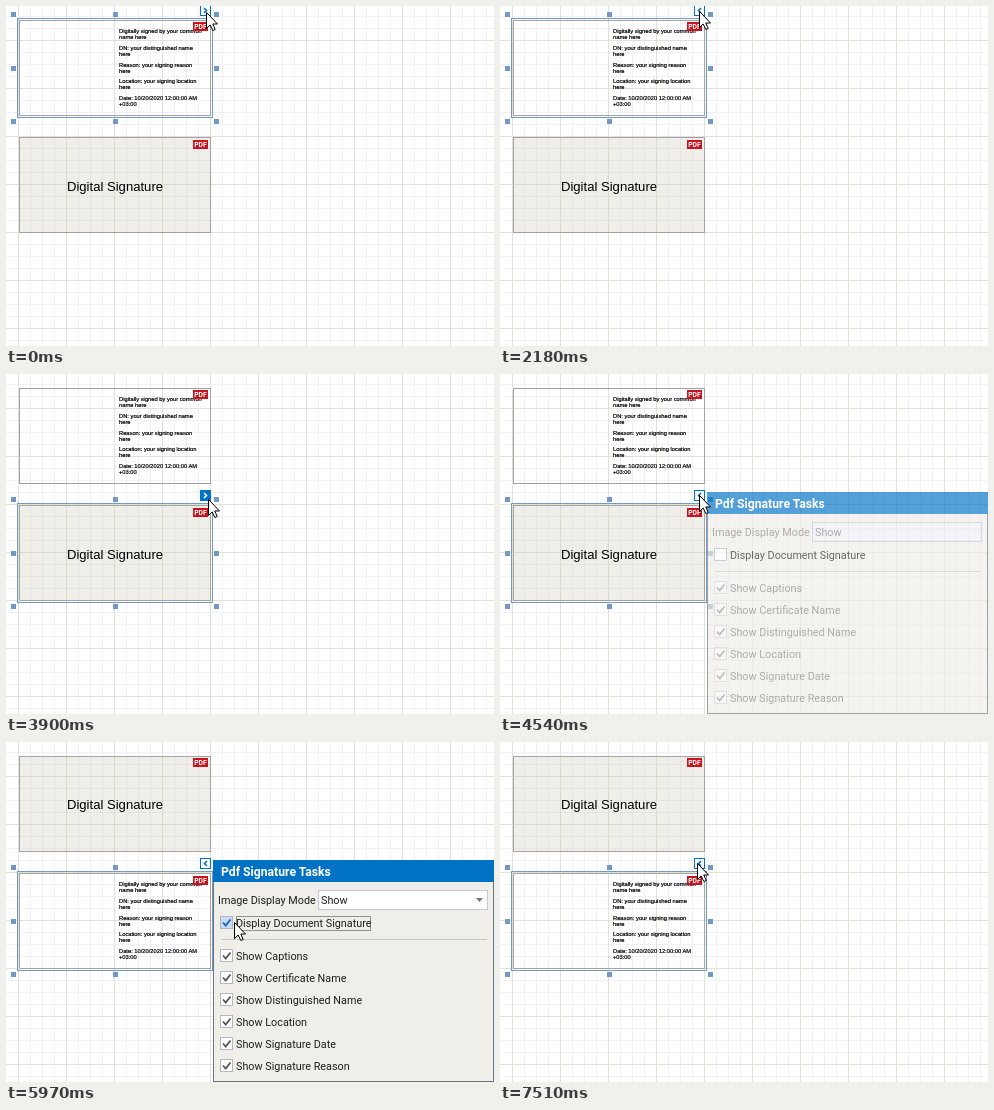
Animation of 488x340 px, one loop 7540 ms. Source, as an HTML page:

```html
<!DOCTYPE html>
<html lang="en">
<head>
<meta charset="utf-8">
<title>Pdf Signature Tasks</title>
<style>
html, body { margin: 0; width: 100%; height: 100%; overflow: hidden; background: #fff; }
svg { display: block; width: 488px; height: 340px; }
text { white-space: pre; }
.small { font: 5.75px "Liberation Sans", Arial, sans-serif; fill: #000; stroke: #000; stroke-width: .2; }
.big { font: 13.1px "Liberation Sans", Arial, sans-serif; text-anchor: middle; }
.pdf { font: bold 6.8px Roboto, "Liberation Sans", sans-serif; fill: #fff; text-anchor: middle; }
.ui { font: 10.8px Roboto, "Open Sans", sans-serif; fill: #1e1e1e; }
.title { font: bold 12.2px Roboto, "Open Sans", sans-serif; fill: #fff; }
.frame { fill: none; stroke: #a3a3a3; }
.line { fill: none; }
</style>
</head>
<body>
<svg viewBox="0 0 488 340">
  <path id="minor" class="line" stroke="#f0f0f6"/>
  <path id="major" class="line" stroke="#e1e1dc"/>
  <g id="blank">
    <rect x="13" y="14" width="192" height="96" fill="#cac6b2" opacity=".3"/>
    <rect class="frame" x="13.5" y="14.5" width="191" height="95"/>
  </g>
  <text id="caption" class="big" x="109" y="67">Digital Signature</text>
  <g id="signed">
    <rect class="frame" x="13.5" y="14.5" width="191" height="95"/>
  </g>
  <g id="badges"></g>
  <g id="select">
    <rect class="line" x="11.5" y="12.5" width="195" height="99" stroke="#7398c4"/>
  </g>
  <g id="tag">
    <rect id="tagBox" x="194.5" y="-.5" width="10" height="10" stroke="#0072c6"/>
    <path id="arrow" class="line" stroke-width="1.6"/>
  </g>
  <g id="panel">
    <rect x="207.5" y="1.5" width="280" height="221" fill="#efeee8" stroke="#6b7484"/>
    <rect x="207" y="1" width="281" height="22" fill="#0072c6"/>
    <text class="title" x="215" y="17">Pdf Signature Tasks</text>
    <path class="line" d="M215 80.5H481" stroke="#c8c8c6"/>
    <rect x="312.5" y="31.5" width="169" height="19" fill="#fff" stroke="#c6c6d6"/>
    <rect id="comboOff" x="313" y="32" width="168" height="18" fill="#eeeef5"/>
    <path id="drop" d="M470 39h7l-3.5 4z" fill="#777"/>
    <g id="options">
      <text class="ui" x="212" y="45">Image Display Mode</text>
      <text class="ui" x="315" y="45">Show</text>
    </g>
    <rect id="focus" class="line" x="230.5" y="57.5" width="134" height="14" stroke="#333" stroke-dasharray="1 1"/>
  </g>
  <path id="cursor" d="M.5 .5V16.5L4.2 13L6.8 18.5L9.2 17.5L6.8 12H11.5Z" fill="#fff" stroke="#000"/>
</svg>
<script>
const $ = id => document.getElementById(id);
const LOOP = 7540, GAP = 117;

function add(parent, tag, attrs, text = "") {
  const el = document.createElementNS("http://www.w3.org/2000/svg", tag);
  for (const key in attrs) el.setAttribute(key, attrs[key]);
  el.textContent = text;
  return parent.appendChild(el);
}

function grid(step) {
  let d = "";
  for (let x = 12.5; x < 488; x += step) d += `M${x} 0V340`;
  for (let y = -13.5; y < 340; y += step) d += `M0 ${y}H488`;
  return d;
}
$("minor").setAttribute("d", grid(12));
$("major").setAttribute("d", grid(48));

const lines = [
  "Digitally signed by your common", "name here",
  "DN: your distinguished name", "here",
  "Reason: your signing reason", "here",
  "Location: your signing location", "here",
  "Date: 10/20/2020 12:00:00 AM", "+03:00"
];
lines.forEach((line, i) => add($("signed"), "text",
  { class: "small", x: 113, y: 27 + Math.floor(i / 2) * 16.8 + i % 2 * 6 }, line));

for (const y of [16, 134]) {
  add($("badges"), "rect", { x: 187, y, width: 15, height: 9, fill: "#c8141e" });
  add($("badges"), "text", { class: "pdf", x: 194.5, y: y + 7 }, "PDF");
}

for (const x of [5, 107, 208])
  for (const y of [6, 60, 113])
    if (x !== 107 || y !== 60)
      add($("select"), "rect", { x, y, width: 5, height: 5, fill: "#7398c4" });

function checkBox(parent, y, label) {
  const box = add(parent, "rect",
    { x: 214.5, y: y - 6.5, width: 12, height: 12, fill: "#fff", stroke: "#b5b5c2" });
  const mark = add(parent, "path",
    { class: "line", d: `M217 ${y - .5}l2.7 3l4.8 -6`, stroke: "#555", "stroke-width": 1.8 });
  add(parent, "text", { class: "ui", x: 230, y: y + 4 }, label);
  return { box, mark };
}
const mainCheck = checkBox($("panel"), 64, "Display Document Signature");
["Captions", "Certificate Name", "Distinguished Name", "Location", "Signature Date", "Signature Reason"]
  .forEach((name, i) => checkBox($("options"), 97 + i * 22, "Show " + name));

// Pointer tip: time, x, y
const path = [
  [0, 200, 6], [30, 200, 6], [60, 199, 5], [2450, 199, 5], [2650, 195, 50],
  [2860, 173, 140], [3020, 160, 185], [3210, 176, 176], [3280, 176, 176],
  [3310, 187, 171], [3470, 187, 171], [3780, 203, 132], [3900, 202, 125],
  [4080, 199, 121], [4800, 199, 121], [5050, 216, 138], [5260, 214, 171],
  [5290, 216, 172], [5500, 228, 180], [6800, 228, 180], [7000, 212, 148],
  [7150, 197, 118], [7220, 197, 121], [LOOP, 197, 121]
];
const ramp = (t, a, b) => Math.min(1, Math.max(0, (t - a) / (b - a)));
const within = (t, a, b) => t >= a && t < b;
const show = (id, alpha) => $(id).setAttribute("opacity", +alpha);
const move = (id, x, y) => $(id).setAttribute("transform", `translate(${x} ${y})`);

function pointer(t) {
  const i = path.findIndex(p => p[0] > t);
  const [t0, x0, y0] = path[i - 1], [t1, x1, y1] = path[i];
  const k = (t - t0) / (t1 - t0);
  return [Math.round(x0 + (x1 - x0) * k), Math.round(y0 + (y1 - y0) * k)];
}

function panelAlpha(t) {
  if (within(t, 490, 2180)) return Math.min(3, Math.floor((t - 490) / 30) + 1) / 3;
  if (within(t, 4510, 7450)) return Math.min(3, Math.floor((t - 4510) / 30) + 1) / 3;
  return within(t, 7450, 7510) ? .5 : 0;
}

function draw(t) {
  const second = t >= 3470, swapped = t >= 5760;
  const shift = second ? GAP : 0;
  move("signed", 0, swapped ? GAP : 0);
  move("blank", 0, swapped ? 0 : GAP);
  move("caption", 0, swapped ? 0 : GAP + 1);
  for (const id of ["select", "tag", "panel"]) move(id, 0, shift);

  const [x, y] = pointer(t);
  move("cursor", x, y);

  const open = within(t, 490, 2280) || t >= 4510;
  const over = x >= 194 && x <= 205 && y <= shift + 10 && y >= shift - 1;
  const light = open || over && !within(t, 3470, 3930);
  $("tagBox").setAttribute("fill", light ? "#fff" : "#0072c6");
  $("arrow").setAttribute("stroke", light ? "#0072c6" : "#fff");
  $("arrow").setAttribute("d", open ? "M201 2l-2.5 2.5l2.5 2.5" : "M198 2l2.5 2.5l-2.5 2.5");

  const on = second ? ramp(t, 5700, 5970) : 1;
  const hover = within(t, 5260, 6890);
  show("panel", panelAlpha(t));
  show("comboOff", 1 - on);
  show("drop", on);
  show("options", .5 + on / 2);
  show("focus", t >= 5660);
  mainCheck.mark.setAttribute("opacity", on);
  mainCheck.mark.setAttribute("stroke", hover ? "#1d62b5" : "#555");
  mainCheck.box.setAttribute("fill", hover ? "#c9dcf5" : "#fff");
}

const start = performance.now();
function tick() {
  draw((performance.now() - start) % LOOP);
  requestAnimationFrame(tick);
}
tick();
</script>
</body>
</html>
```
